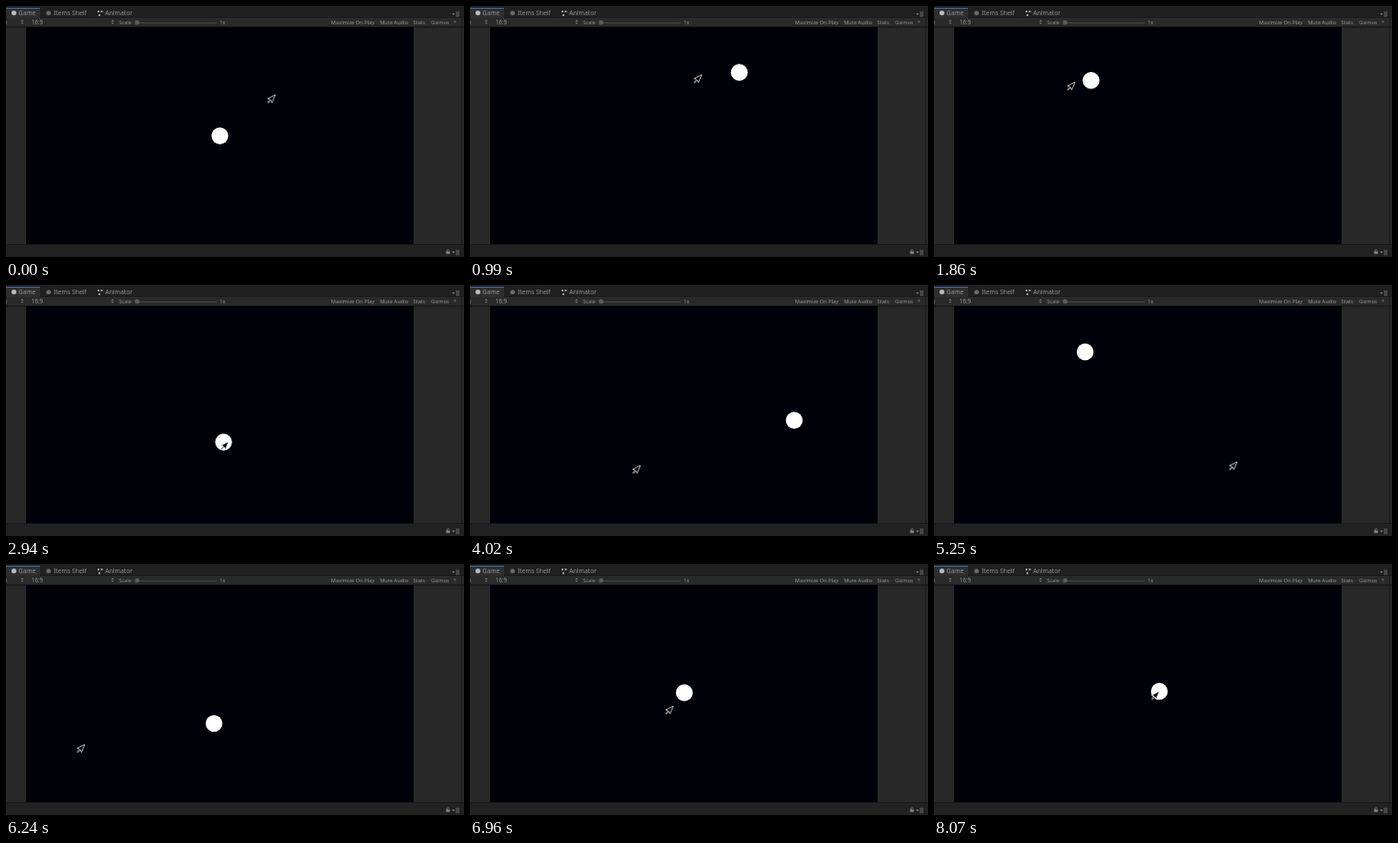
Write an HTML page that moves like this. It is 500 px wide and 274 px high and loops after 8.43 s.

```html
<!DOCTYPE html>
<html lang="en">
<head>
<meta charset="utf-8">
<title>Click to move</title>
<style>
  html, body { margin: 0; width: 100%; height: 100%; overflow: hidden; background: #282828; }
  svg { display: block; width: 100vw; height: 100vh; }
  text { font-family: "Noto Sans", "Open Sans", sans-serif; font-size: 5.7px; fill: #969696; }
  .tab { font-size: 6.8px; fill: #949494; }
</style>
</head>
<body>
<svg viewBox="0 0 500 274" xmlns="http://www.w3.org/2000/svg">
  <defs>
    <g id="menu">
      <path d="M0 1.5h3l-1.5 2z" fill="#888"/>
      <path d="M4 .5h4M4 2.500h4M4 4.500h4" stroke="#808080" stroke-width=".8"/>
    </g>
    <path id="updown" d="M0 2l1.3-1.8L2.6 2zM0 3l1.3 1.8L2.6 3z" fill="#808080"/>
  </defs>

  <rect width="500" height="274" fill="#282828"/>
  <rect width="500" height="13" fill="#202020"/>
  <rect y="2" width="37" height="11" fill="#2e2e2e"/>
  <rect y="2" width="37" height="1" fill="#3a6ea8"/>
  <rect y="13" width="500" height="9" fill="#2a2a2a"/>
  <rect y="22" width="500" height="2" fill="#1c1c1c"/>
  <path d="M37 12.500H500" stroke="#1a1a1a"/>

  <circle cx="8.700" cy="7.600" r="2.700" fill="#b8b8b8"/>
  <text class="tab" x="13.500" y="10.200">Game</text>
  <circle cx="46.500" cy="7.700" r="2.500" fill="#6a6a6a"/>
  <text class="tab" x="52" y="10.200">Items Shelf</text>
  <path d="M100 5h2v2h-2zM103.500 5h2v2h-2zM101 9h2v2h-2z" fill="#a0a0a0"/>
  <text class="tab" x="108.300" y="10.200">Animator</text>
  <use href="#menu" x="487" y="6.500"/>

  <text x="-1.500" y="19.600">1</text>
  <use href="#updown" x="16.300" y="14.900"/>
  <text x="28" y="19.600" style="font-size:6.2px">16:9</text>
  <use href="#updown" x="115" y="14.900"/>
  <text x="123.200" y="19.900">Scale</text>
  <path d="M141 18.500H230" stroke="#464646"/>
  <circle cx="143" cy="18" r="2.500" fill="#5c5c5c"/>
  <text x="233.300" y="19.900">1x</text>
  <text x="354.800" y="19.600">Maximize On Play</text>
  <text x="408.200" y="19.600">Mute Audio</text>
  <text x="444.500" y="19.600">Stats</text>
  <text x="464" y="19.600">Gizmos</text>
  <path d="M488.500 16.500h3l-1.500 2z" fill="#7c7c7c"/>

  <rect x="22" y="23" width="423" height="237" fill="#000008"/>
  <rect y="260" width="500" height="14" fill="#222"/>
  <path d="M0 260.500H500" stroke="#181818"/>
  <path d="M497.500 13V260" stroke="#1c1c1c"/>
  <rect x="480.500" y="267.800" width="4" height="2.800" fill="#888"/>
  <path d="M481.500 268v-1a1.100 1.100 0 0 1 2.200 0" fill="none" stroke="#888" stroke-width=".7"/>
  <use href="#menu" x="487" y="266.500"/>

  <circle id="ball" r="9.200" fill="#fff"/>
  <path id="cursor" d="M0 0L-8.400 4.200L-5.600 5.200L-8.400 8L-7.600 8.800L-4.700 6L-3.600 8.600Z"
        fill="#000008" stroke="#e4e4e4" stroke-width=".8" stroke-linejoin="round"/>
</svg>
<script>
const LOOP = 8430, STEP = 30;
const BALL_SPEED = 0.2625; // px per ms

// The pointer reaches each stop, then clicks there; the ball chases the last click.
const stops = [
  { x: 294, y: 72.5, arrive: 115, click: 405 },
  { x: 154, y: 82.5, arrive: 1110, click: 1392 },
  { x: 238.5, y: 172.5, arrive: 2280, click: 2475 },
  { x: 358, y: 146.5, arrive: 3090, click: 3285 },
  { x: 186, y: 197, arrive: 3810, click: 4004 },
  { x: 165, y: 73, arrive: 4640, click: 4755 },
  { x: 330.5, y: 192.5, arrive: 5235, click: 5405 },
  { x: 85, y: 197.5, arrive: 5970, click: 5995 },
  { x: 365, y: 72.5, arrive: 6567, click: 6567 },
  { x: 222, y: 154.5, arrive: 6930 },
  { x: 246, y: 139, arrive: 7460, click: 7524 }
];
const clicks = stops.filter(stop => stop.click);

const clamp = u => Math.max(0, Math.min(1, u));
const smooth = u => u * u * (3 - 2 * u);
const distance = (a, b) => Math.hypot(b.x - a.x, b.y - a.y);
const mix = (a, b, u) => ({ x: a.x + (b.x - a.x) * u, y: a.y + (b.y - a.y) * u });

function ballAt(time) {
  let point = { x: 233.5, y: 141.7 };
  clicks.forEach((target, i) => {
    const end = Math.min(time, clicks[i + 1]?.click ?? LOOP);
    const reach = Math.max(0, end - target.click) * BALL_SPEED;
    point = mix(point, target, clamp(reach / (distance(point, target) || 1)));
  });
  return point;
}

function cursorAt(time) {
  let from = { x: 293.5, y: 96.5 }, point = from;
  for (const stop of stops) {
    const duration = 60 + 0.9 * distance(from, stop);
    const u = clamp((time - stop.arrive) / duration + 1);
    if (u > 0) point = mix(from, stop, smooth(u));
    from = stop;
  }
  return { x: Math.round(point.x), y: Math.round(point.y) };
}

const ball = document.getElementById("ball");
const cursor = document.getElementById("cursor");
const place = (node, { x, y }) => node.setAttribute("transform", `translate(${x} ${y})`);

function render(ms) {
  const time = Math.floor((ms % LOOP) / STEP) * STEP;
  place(ball, ballAt(time));
  place(cursor, cursorAt(time));
}

const begin = performance.now();
function frame() {
  render(performance.now() - begin);
  requestAnimationFrame(frame);
}
frame();
</script>
</body>
</html>
```
